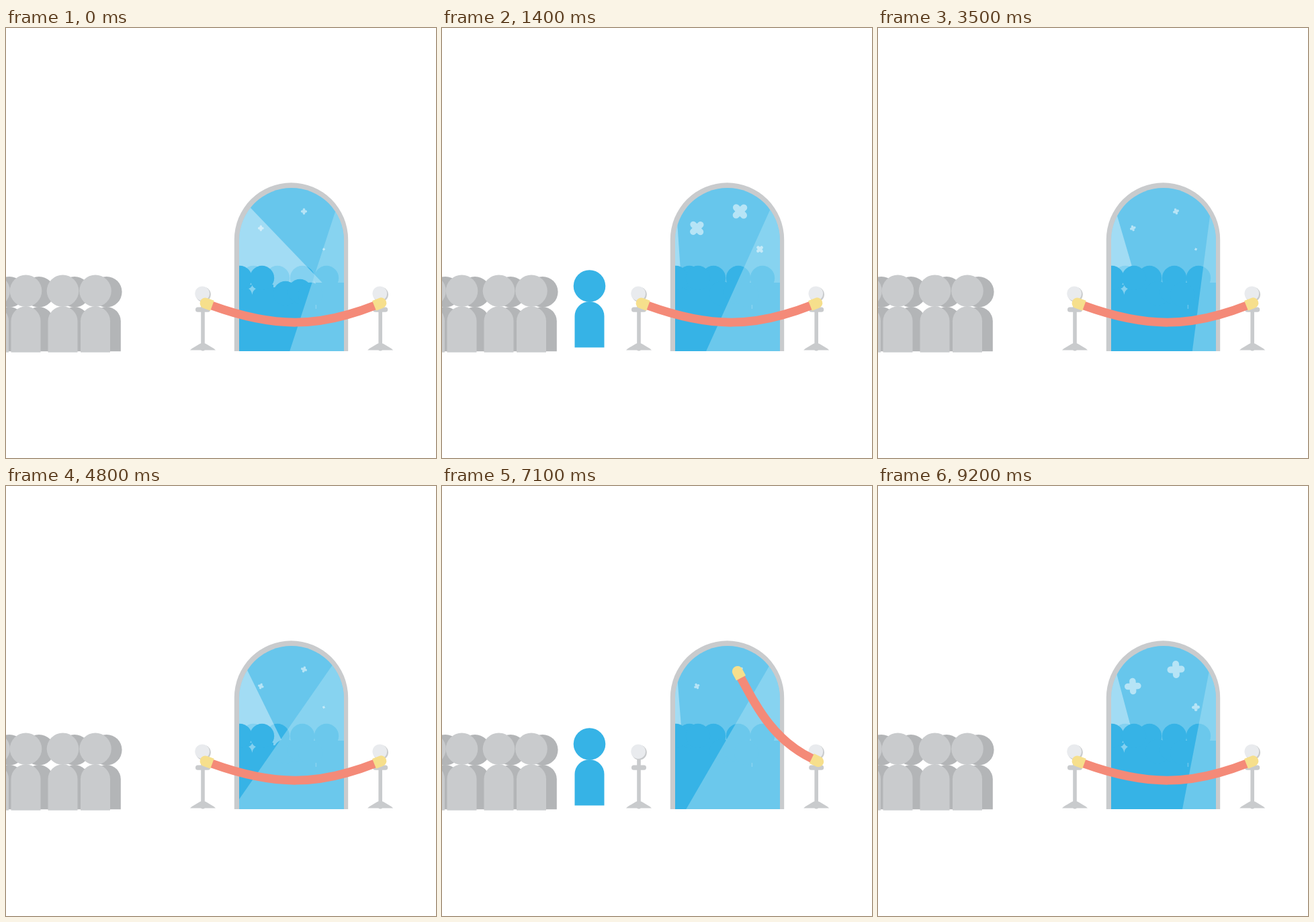
Animation of 640 by 640 pixels, one loop 9.3 s. Source, as an HTML page:

```html
<!DOCTYPE html>
<html lang="en">
<head>
<meta charset="utf-8">
<title>Queue at the door</title>
<style>
html, body { margin: 0; width: 100%; height: 100%; overflow: hidden; background: #fff; }
svg { display: block; width: 100vw; height: 100vh; }
</style>
</head>
<body>
<svg viewBox="0 0 640 640">
  <defs>
    <g id="person">
      <circle cy="-45.75" r="23.8"/>
      <path d="M-22 45.75V-.75A22 22 0 0 1 22-.75V45.75Z"/>
    </g>
    <g id="post">
      <g fill="#c9cbcd">
        <rect x="-2.8" y="403" width="5.6" height="77.5" rx="2"/>
        <rect x="-11" y="415.5" width="22" height="7.3" rx="3.6"/>
        <path d="M-19 479.5Q-17 477-12 474.5Q-3 468.5 0 468.5Q3 468.5 12 474.5Q17 477 19 479.5Z"/>
        <circle cx=".6" cy="396.6" r="11.2"/>
      </g>
      <circle cx="-.9" cy="395.2" r="10.8" fill="#e9ebee"/>
    </g>
    <path id="cap" d="M-1-8H10A8 8 0 0 1 10 8H-1Z" fill="#f6df8c"/>
    <path id="plus" d="M-8 0H8M0-8V8" fill="none" stroke="#fff" stroke-width="10" stroke-linecap="round"/>
    <clipPath id="glass"><path d="M347 481V316A78 78 0 0 1 503 316V481Z"/></clipPath>
    <clipPath id="doorway"><rect x="-100" y="0" width="603" height="640"/></clipPath>
  </defs>

  <path d="M339.8 481V315A84.7 84.7 0 0 1 509.2 315V481Z" fill="#c9cbcd"/>
  <g clip-path="url(#glass)">
    <rect x="340" y="230" width="170" height="252" fill="#67c6ec"/>
    <g id="rearGuests" fill="#36b3e6"><rect x="347" y="379" width="156" height="103"/></g>
    <path id="beamL" fill="#fff" opacity=".39"/>
    <g id="frontGuests" fill="#36b3e6">
      <path fill-rule="evenodd" d="M347 481V382H398V386H461V379H503V481Z
        M366.5 382Q367 386 372 388Q367 391 366.5 397Q365 390 361 388Q366 386 366.5 382Z"/>
    </g>
    <rect x="460.6" y="412" width="1.6" height="6" fill="#fff" opacity=".25"/>
    <path id="beamR" fill="#b1e4f3" opacity=".43"/>
    <g id="sparks" opacity=".52"></g>
  </g>

  <g id="rearQueue" fill="#b3b5b7"></g>
  <g clip-path="url(#doorway)"><use id="guest" href="#person" fill="#36b3e6"/></g>
  <g id="frontQueue" fill="#c9cbcd"></g>

  <use href="#post" x="293"/>
  <use href="#post" x="557.2"/>
  <path id="rope" fill="none" stroke="#f48a78" stroke-width="13"/>
  <use id="capA" href="#cap"/>
  <use id="capB" href="#cap"/>
</svg>
<script>
const LOOP = 9300, STEP = 100, SECOND_VISIT = 5200;
const $ = id => document.getElementById(id);
const set = (el, attrs) => { for (const k in attrs) el.setAttribute(k, attrs[k]); };
const add = (parent, tag, attrs) => {
  const el = document.createElementNS('http://www.w3.org/2000/svg', tag);
  set(el, attrs);
  return parent.appendChild(el);
};
const rad = deg => deg * Math.PI / 180;
const lerp = (a, b, u) => a.map((v, i) => v + (b[i] - v) * u);

// Static crowds
for (const x of [149.6, 102, 49, 5])
  add($('rearQueue'), 'use', { href: '#person', transform: `translate(${x} 437) scale(.965)` });
for (const x of [133, 84.5, 29.5, -18])
  add($('frontQueue'), 'use', { href: '#person', x, y: 437 });
const heads = (id, list) => list.forEach(([cx, cy]) => add($(id), 'circle', { cx, cy, r: 18.2 }));
heads('rearGuests', [368, 404, 441, 477].map(x => [x, 372]));
heads('frontGuests', [[348, 372], [381, 372], [416, 395], [437.5, 392], [453, 397]]);

const sparks = [[443.5, 273, 1], [379.3, 298, .95], [473, 329.3, .46]]
  .map(([x, y, size]) => ({ x, y, size, el: add($('sparks'), 'use', { href: '#plus' }) }));

function drawDoor(t) {
  const slopeL = Math.tan(rad(24 + 22 * Math.cos(rad(26 + t * .127))));
  const slopeR = Math.tan(rad(20.8 + 14.2 * Math.cos(rad(101 + t * .131))));
  set($('beamL'), { d: `M347.5 250.5L${347.5 + 249.5 * slopeL} 500H340V250Z` });
  set($('beamR'), { d: `M498 249L${498 - 251 * slopeR} 500H520V249Z` });
  const pulse = .68 + .37 * Math.cos((t - 250) / 600 * 2 * Math.PI);
  for (const p of sparks)
    set(p.el, { transform: `translate(${p.x} ${p.y}) rotate(${t * .0975}) scale(${pulse * p.size})` });
}

// The visitor hops in, waits, then hops through the door, swaying
const ARRIVE = 1050, LEAVE = 2050;
function drawGuest(t) {
  const x = 219.5 + .325 * Math.min(t - 1020, 0) + .328 * Math.max(t - 2190, 0);
  const sway = Math.cos((t - 2300) / 500 * Math.PI);
  const hop = t < ARRIVE || t > LEAVE ? sway * sway : 0;
  const tilt = t > LEAVE ? -12.6 * sway : -4 * hop;
  set($('guest'), {
    transform: `translate(${x} ${429.75 - 16.5 * hop}) rotate(${tilt})`,
    visibility: t > 350 && t < 3200 ? 'visible' : 'hidden'
  });
}

// Rope poses: one cubic from the fixed end to the loose end
const shut = [549, 413, 465, 446, 400, 447, 306, 413];
const up = [553, 400, 515, 320, 525, 230, 560, 178];
const open = [556, 400, 532, 290, 515, 215, 617, 208];
const idle = [556, 400, 528.5, 292, 511.5, 218, 619, 211.5];
const swing = [[1780, shut], [2000, up], [2120, lerp(up, open, 1.3)], [2260, open], [2800, idle], [3000, shut]];

function ropePose(t) {
  const i = swing.findIndex(([time]) => t < time);
  if (i === 0) return shut;
  if (i > 0) {
    const [t0, a] = swing[i - 1], [t1, b] = swing[i];
    return lerp(a, b, (t - t0) / (t1 - t0));
  }
  const age = t - 3000;
  const bounce = age < 400 ? 10 * Math.exp(-age / 120) * Math.sin(age / 50) : 0;
  return shut.map((v, j) => j === 3 || j === 5 ? v + bounce : v);
}

function placeCap(el, x, y, fromX, fromY) {
  const a = Math.atan2(y - fromY, x - fromX) * 180 / Math.PI;
  set(el, { transform: `translate(${x} ${y}) rotate(${a})` });
}

function drawRope(t) {
  const p = ropePose(t);
  set($('rope'), { d: `M${p[0]} ${p[1]}C${p.slice(2).join(' ')}` });
  placeCap($('capA'), p[0], p[1], p[2], p[3]);
  placeCap($('capB'), p[6], p[7], p[4], p[5]);
}

function draw(now) {
  const t = Math.floor(now % LOOP / STEP) * STEP;
  const visit = t < SECOND_VISIT ? t : t - SECOND_VISIT;
  drawDoor(t);
  drawGuest(visit);
  drawRope(visit);
}

let start;
function tick(now) {
  start ??= now;
  draw(now - start);
  requestAnimationFrame(tick);
}
draw(0);
requestAnimationFrame(tick);
</script>
</body>
</html>
```
